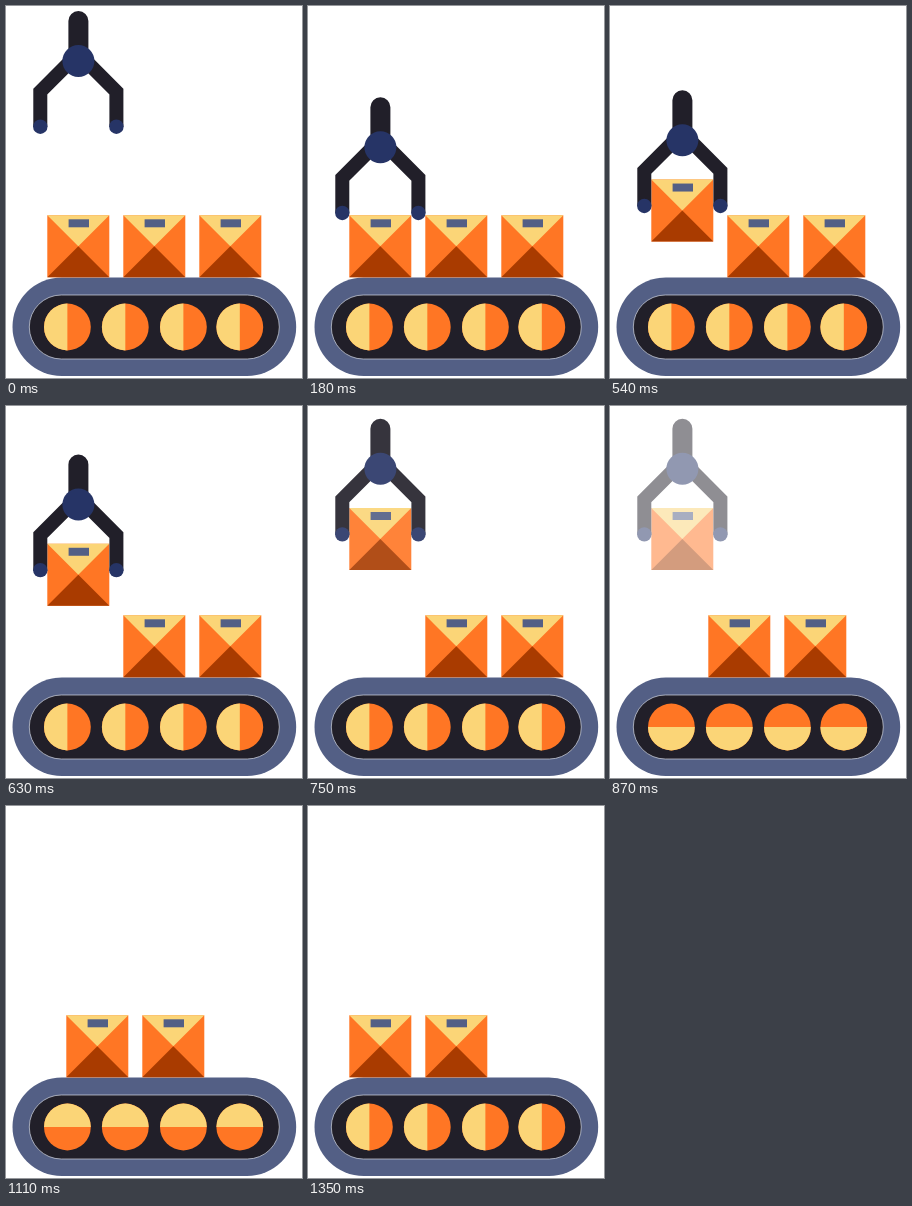
An HTML page for the animation above (1.86 s loop, 296 by 372 pixels).

```html
<!DOCTYPE html>
<html lang="en">
<head>
<meta charset="utf-8">
<title>Conveyor and claw</title>
<style>
  html, body { margin: 0; width: 100%; height: 100%; overflow: hidden; background: #fff; }
  svg { display: block; width: 100%; height: 100%; }
  .dark { fill: #211f29; }
  .navy { fill: #263466; }
  .slate { fill: #535f85; }
  .orange { fill: #ff7624; }
  .yellow { fill: #fbd577; }
  .brown { fill: #a93b00; }
</style>
</head>
<body>
<svg viewBox="0 0 296 372">
  <defs>
    <g id="box">
      <path class="orange" d="M0 0h62v62H0z"/>
      <path class="yellow" d="M0 0h62L31 31z"/>
      <path class="brown" d="M0 62h62L31 31z"/>
      <path class="slate" d="M21.3 4h20.4v8H21.3z"/>
    </g>
    <g id="wheel">
      <circle class="orange" r="23.4"/>
      <path class="yellow" d="M0 -23.4a23.4 23.4 0 0 0 0 46.8z"/>
    </g>
  </defs>

  <rect class="slate" x="6.5" y="271.5" width="283.7" height="98.5" rx="49.25"/>
  <rect class="dark" x="23.3" y="289" width="250" height="64" rx="32" stroke="#d5d8e2" stroke-width=".7"/>
  <g id="wheels"></g>

  <g id="queue">
    <use href="#box" x="117.3" y="209.3"/>
    <use href="#box" x="193.3" y="209.3"/>
  </g>

  <g id="load">
    <use id="held" href="#box" x="41.3"/>
    <g id="claw">
      <path class="dark" d="M62.4 55V15a10 10 0 0 1 20 0v40z"/>
      <path d="M34.3 121V85.6L72.4 47.5l38 38.1V121" fill="none" stroke="#211f29" stroke-width="14"/>
      <circle class="navy" cx="72.4" cy="55" r="16"/>
      <circle class="navy" cx="34.3" cy="120.7" r="7.2"/>
      <circle class="navy" cx="110.4" cy="120.7" r="7.2"/>
    </g>
  </g>
</svg>
<script>
  const LOOP = 1860, STEP = 30;
  const BOX_TOP = 209.3, BOX_SPACING = 76, DROP = 115, LIFT = 107.3;
  const byId = id => document.getElementById(id);
  const [wheels, queue, load, held, claw] =
    ['wheels', 'queue', 'load', 'held', 'claw'].map(byId);
  const wheelCentres = [61.4, 119.3, 177.4, 233.8];

  wheels.innerHTML = wheelCentres.map(() => '<use href="#wheel"/>').join('');

  // Linear progress from 0 to 1 between two times
  const progress = (t, from, to) => Math.min(1, Math.max(0, (t - from) / (to - from)));

  function draw(t) {
    const lift = LIFT * progress(t, 450, 720);
    const travel = progress(t, 750, 1230);

    claw.setAttribute('transform', `translate(0 ${DROP * progress(t, 0, 240) - lift})`);
    held.setAttribute('y', BOX_TOP - lift);
    load.setAttribute('opacity', 1 - progress(t, 720, 1020));
    queue.setAttribute('transform', `translate(${-BOX_SPACING * travel} 0)`);
    wheelCentres.forEach((x, i) => wheels.children[i].setAttribute(
      'transform', `translate(${x} 321) rotate(${-360 * travel})`));
  }

  const start = performance.now();
  function tick() {
    const t = (performance.now() - start) % LOOP;
    draw(Math.floor(t / STEP) * STEP);
    requestAnimationFrame(tick);
  }
  draw(0);
  requestAnimationFrame(tick);
</script>
</body>
</html>
```
